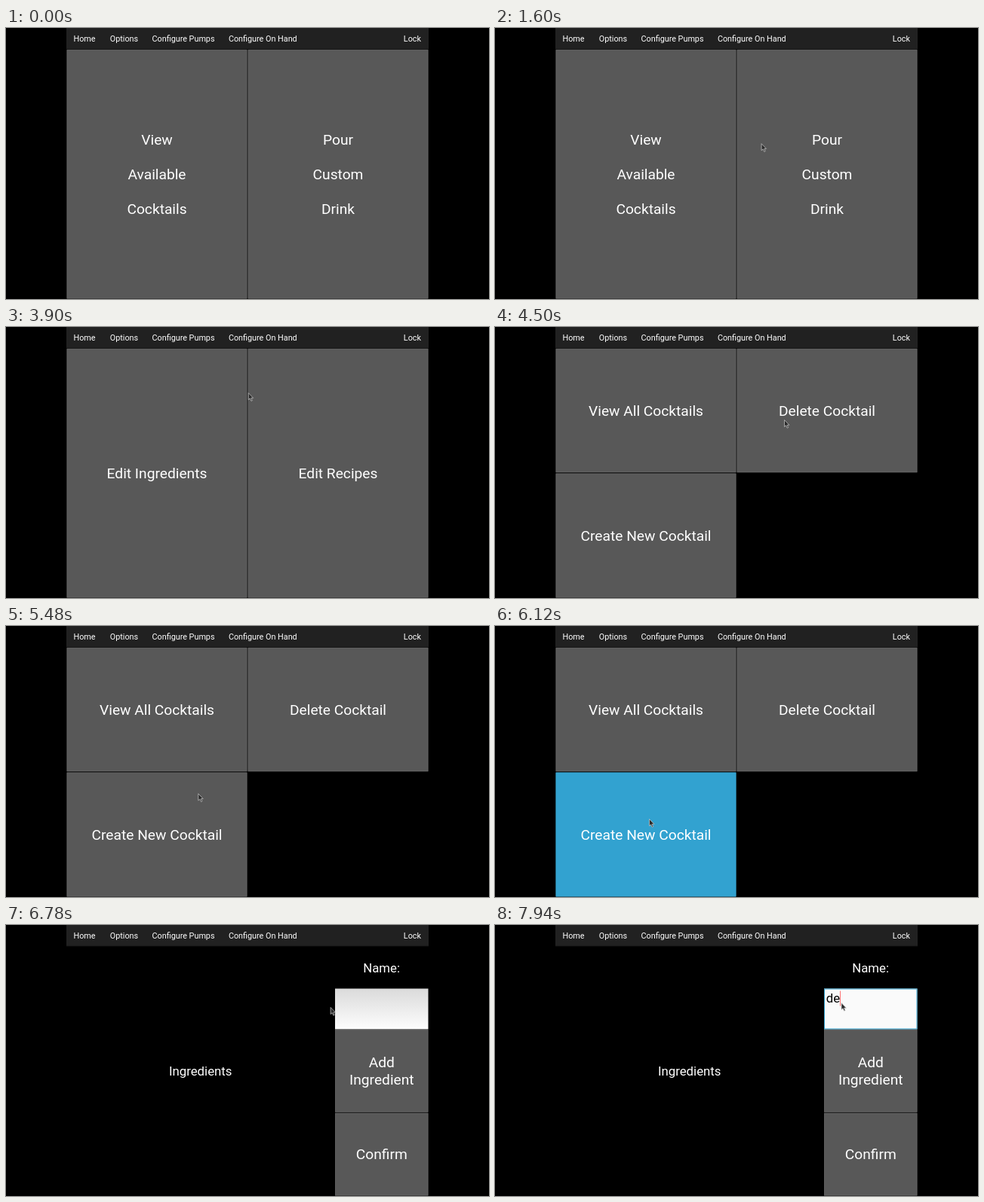
These frames come from a looping animation (640x360 px, 8 s). An HTML page with a canvas:

```html
<!DOCTYPE html>
<html lang="en">
<head>
<meta charset="utf-8">
<title>Cocktail machine</title>
<style>
html, body { margin: 0; width: 100%; height: 100%; overflow: hidden; background: #000; }
canvas { display: block; width: 100vw; height: 100vh; }
</style>
</head>
<body>
<canvas id="stage" width="640" height="360"></canvas>
<script>
const ctx = document.getElementById('stage').getContext('2d');
const LOOP = 8000;
const BLUE = '#32a2d0';

// Moments of the story, in ms
const T = {
  pointerIn: 1400,
  optionsDown: 2820, editMenu: 3020,
  recipesDown: 4300, cocktailMenu: 4500,
  createDown: 6080, form: 6240,
  focus: 7160, firstLetter: 7760, secondLetter: 7940
};

// Pointer keys: time, x, y
const path = [
  [1400, 558, 294.5], [1660, 332.5, 139.5],
  [1940, 332.5, 139.5], [2640, 172, 19.5], [2720, 169, 19.5],
  [3480, 169, 19.5], [3900, 321, 87.5], [4280, 383.5, 123.5],
  [4860, 383.5, 123.5], [5680, 218.5, 248.5], [5880, 204.5, 256.5],
  [6440, 204.5, 256.5], [6780, 430, 109.5], [7140, 459, 103.5]
];

const slope = (i, axis) => {
  const a = path[i], b = path[i + 1];
  return a && b ? (b[axis] - a[axis]) / (b[0] - a[0]) : 0;
};

// Monotone tangents: rests stay still, passing points stay smooth
function tangent(i, axis) {
  if (i === 0) return slope(0, axis);
  const before = slope(i - 1, axis), after = slope(i, axis);
  return before * after <= 0 ? 0 : 2 * before * after / (before + after);
}

function pointerAt(t) {
  const last = path.length - 1;
  if (t >= path[last][0]) return path[last].slice(1);
  let i = 0;
  while (t >= path[i + 1][0]) i++;
  const span = path[i + 1][0] - path[i][0];
  const u = (t - path[i][0]) / span, v = 1 - u;
  return [1, 2].map(axis =>
    path[i][axis] * v * v * (1 + 2 * u) +
    path[i + 1][axis] * u * u * (3 - 2 * u) +
    span * u * v * (tangent(i, axis) * v - tangent(i + 1, axis) * u));
}

function rect(x, y, w, h, fill) {
  ctx.fillStyle = fill;
  ctx.fillRect(x, y, w, h);
}

function text(str, x, baseline, size, color = '#fff', align = 'center') {
  ctx.font = size + 'px Roboto, sans-serif';
  ctx.textAlign = align;
  ctx.fillStyle = color;
  ctx.fillText(str, x, baseline);
}

function button(x, y, w, h, lines, down = false, lineHeight = 22.8) {
  const left = x + 0.6, top = y + 0.6, width = w - 1.2, height = h - 1.2;
  rect(left, top, width, height, down ? BLUE : '#585858');
  ctx.strokeStyle = down ? '#3aa9d6' : '#686868';
  ctx.lineWidth = 0.7;
  ctx.strokeRect(left + 0.4, top + 0.4, width - 0.8, height - 0.8);
  const first = y + h / 2 + 6.8 - (lines.length - 1) * lineHeight / 2;
  lines.forEach((line, i) => text(line, x + w / 2, first + i * lineHeight, 19.2));
}

function navBar(optionsDown) {
  rect(80, 0, 480, 28, '#212121');
  rect(80, 27.6, 480, 0.8, '#161616');
  if (optionsDown) rect(128, 0, 57, 28, BLUE);
  text('Home', 104, 18, 10.8);
  text('Options', 156.4, 18, 10.8);
  text('Configure Pumps', 235, 18, 10.8);
  text('Configure On Hand', 340.3, 18, 10.8);
  text('Lock', 538.4, 18, 10.8);
}

function homeScreen() {
  button(80, 28.2, 240, 331.8, ['View', 'Available', 'Cocktails'], false, 45.7);
  button(320, 28.2, 240, 331.8, ['Pour', 'Custom', 'Drink'], false, 45.7);
}

function editScreen(t) {
  button(80, 28.2, 240, 331.8, ['Edit Ingredients']);
  button(320, 28.2, 240, 331.8, ['Edit Recipes'], t >= T.recipesDown);
}

function cocktailScreen(t) {
  button(80, 28.2, 240, 165.6, ['View All Cocktails']);
  button(320, 28.2, 240, 165.6, ['Delete Cocktail']);
  button(80, 194, 240, 166, ['Create New Cocktail'], t >= T.createDown);
}

function nameField(t) {
  if (t < T.focus) {
    const shade = ctx.createLinearGradient(0, 84, 0, 138);
    shade.addColorStop(0, '#dadada');
    shade.addColorStop(1, '#fdfdfd');
    rect(436, 84.5, 123.5, 54, shade);
    return;
  }
  rect(436, 84.5, 123.5, 54, '#fafafa');
  ctx.strokeStyle = BLUE;
  ctx.lineWidth = 1;
  ctx.strokeRect(436.5, 85, 122.5, 53);
  const typed = t >= T.secondLetter ? 'de' : t >= T.firstLetter ? 'd' : '';
  text(typed, 438.8, 103.3, 16.8, '#000', 'left');
  rect(438.8 + ctx.measureText(typed).width, 87.6, 0.8, 20, '#ff5050');
}

function formScreen(t) {
  text('Ingredients', 257.7, 200.4, 16.8);
  text('Name:', 497.6, 62.5, 16.8);
  nameField(t);
  button(435.6, 138.6, 124.4, 110.6, ['Add', 'Ingredient']);
  button(435.6, 249.2, 124.4, 110.8, ['Confirm']);
}

const arrow = new Path2D('M0 0V9L2 7.2L3.7 10.7L5.1 10L3.6 6.7H6.4Z');

function pointer(t) {
  if (t < T.pointerIn) return;
  ctx.save();
  ctx.translate(...pointerAt(t));
  ctx.fillStyle = '#2a2a2a';
  ctx.fill(arrow);
  ctx.strokeStyle = '#d0d0d0';
  ctx.lineWidth = 0.7;
  ctx.stroke(arrow);
  ctx.restore();
}

function draw(t) {
  rect(0, 0, 640, 360, '#000');
  navBar(t >= T.optionsDown && t < T.editMenu);
  if (t < T.editMenu) homeScreen();
  else if (t < T.cocktailMenu) editScreen(t);
  else if (t < T.form) cocktailScreen(t);
  else formScreen(t);
  pointer(t);
}

const start = performance.now();
function tick() {
  draw((performance.now() - start) % LOOP);
  requestAnimationFrame(tick);
}
tick();
</script>
</body>
</html>
```
